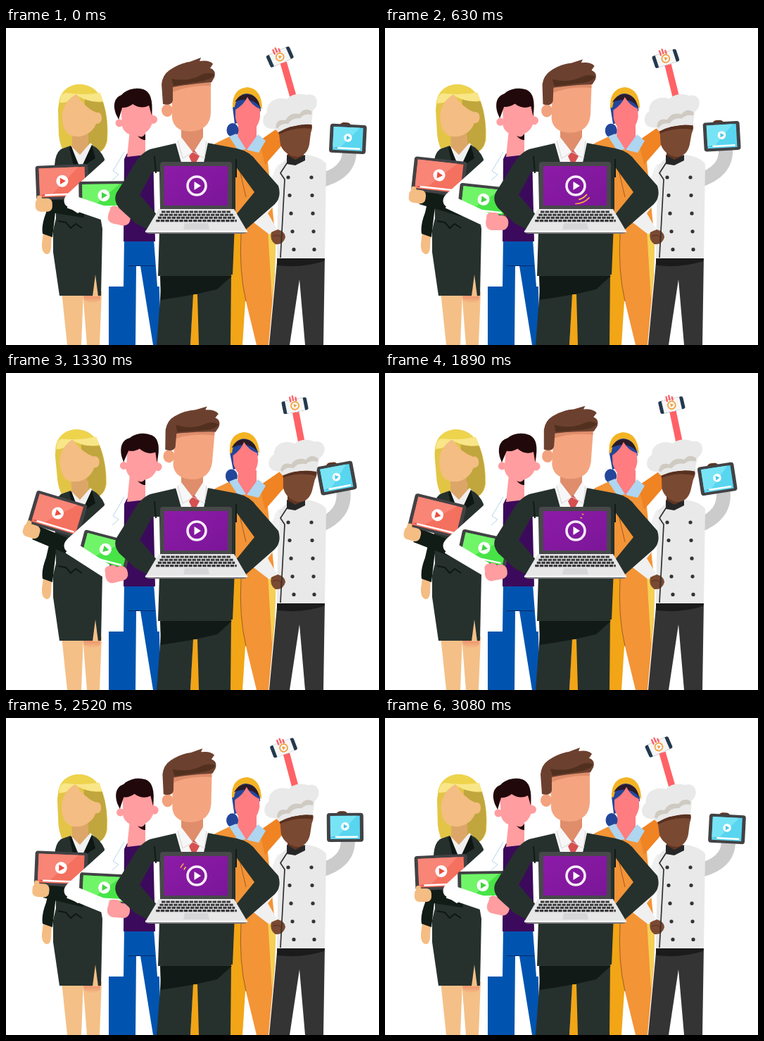
An HTML page for the animation above (3.15 s loop, 530 px wide and 450 px high).

```html
<!DOCTYPE html>
<html lang="en">
<head>
<meta charset="utf-8">
<title>Team with play screens</title>
<style>
html, body { margin: 0; width: 100%; height: 100%; overflow: hidden; background: #fff; }
svg { display: block; width: 530px; height: 450px; }
</style>
</head>
<body>
<svg id="stage" viewBox="0 0 530 450">
  <defs>
    <linearGradient id="purple" x2="1" y2="1">
      <stop stop-color="#8d1ba8"/><stop offset="1" stop-color="#7b1698"/>
    </linearGradient>
    <linearGradient id="blush" x2="0" y2="1">
      <stop stop-color="#ee8a68"/><stop offset="1" stop-color="#f4c088"/>
    </linearGradient>
  </defs>

  <g id="assistant">
    <path fill="#f4c088" d="M79 374H110L107 450H87ZM109 374H136L133 450H115Z"/>
    <path fill="url(#blush)" d="M110 378H134V386Q122 396 111 386Z"/>
    <path fill="#f4bd83" d="M53 291H65L64 312Q63 322 57 321Q50 318 51 306Z"/>
    <path fill="#111c16" d="M74 238L70 262L66 297L52 292Q50 280 57 262L62 240Z"/>
    <g id="blondHead">
      <path fill="#e3c546" d="M104 80C86 81 76 92 74 116L75 152Q77 170 84 178H124Q140 178 144 160C146 136 142 114 137 103C131 88 119 80 104 80Z"/>
      <path fill="#c0a63d" d="M112 100Q128 107 138 105Q146 132 143 160Q139 178 124 178H110Z"/>
      <path fill="#eed44d" d="M104 80C86 81 77 92 75 106Q104 92 138 105C131 88 119 80 104 80Z"/>
      <path fill="#f8e688" d="M77 100Q79 93 85 92Q112 96 134 92L138 104Q118 107 102 96Q90 107 76 106Z"/>
      <path fill="#dda669" d="M94 148H117V172L105 184L94 172Z"/>
      <path fill="#f4bd83" d="M100 94Q83 103 80 122Q79 143 89 151Q99 157 112 152Q124 147 128 136Q137 136 136 126Q135 119 128 120Q113 114 100 94Z"/>
    </g>
    <path fill="#dda669" d="M95 154H117V172L105 184L95 172Z"/>
    <path fill="#f0f0f0" d="M92 167L105 180L120 163L127 170L108 198H95Z"/>
    <path fill="#26312d" d="M92 167L78 172Q70 178 69 195L71 270L67 287V318L76 380H135L137 285L133 262L140 186Q134 172 122 166L106 200Z"/>
    <path fill="#f4c088" d="M127 350L123 381H131Z"/>
    <path fill="none" stroke="#0e1713" stroke-width="2" d="M74 274L85 276L92 284L99 278L108 284"/>
    <path fill="#0e1713" d="M90 170L96 196L104 199L93 168ZM122 166L127 185L116 192L107 200Z"/>
    <line id="blondArm" stroke="#111c16" stroke-width="21"/>
    <g id="redTablet"></g>
    <g id="blondHand" fill="#f4bd83">
      <rect x="-11" y="-9" width="24" height="19" rx="7"/>
      <rect x="-9" y="-13" width="7" height="13" rx="3"/>
    </g>
  </g>

  <g id="doctor">
    <path fill="#0054b0" d="M167 300H216L220 450H209L191 338H185L184 450H146V362Z"/>
    <path fill="none" stroke="#062b66" d="M173 337.500H212"/>
    <path fill="#fff" d="M166 174L140 190L138 268L137 367H167L168 298L210 300L215 367H222L218 174Z"/>
    <path fill="#3c0a5c" d="M172 178H209L212 303H167L168 186Z"/>
    <path fill="#ff9da0" d="M176 144H198V180L172 183Z"/>
    <path fill="#25090b" d="M187 153Q194 157 198 150V159Q192 159 187 153Z"/>
    <g id="doctorHead">
      <circle cx="161" cy="135" r="5.500" fill="#ff9da0"/><circle cx="209" cy="130" r="6" fill="#ff9da0"/>
      <path fill="#ff9da0" d="M163 108L205 103L209 128Q207 149 188 152Q170 154 165 140Z"/>
      <path fill="#21080a" d="M160 130L156 122Q150 105 160 97Q165 95 167 92Q180 83 195 87Q210 92 207 124L203 110Q192 116 180 108Q172 114 165 113Z"/>
    </g>
    <path fill="#fff" d="M166 174L140 188L90 233Q78 243 85 252L102 263L152 230Z"/>
    <path fill="none" stroke="#b6d6ea" d="M168 176L152 203L160 208L151 216"/>
    <g id="greenTablet"></g>
    <line id="doctorArm" stroke="#fff" stroke-width="20"/>
    <g id="doctorHand" fill="#ff9da0">
      <rect x="-16" y="-10" width="32" height="21" rx="9"/>
      <rect x="-15" y="-14" width="18" height="14" rx="6"/>
    </g>
  </g>

  <g id="worker">
    <line id="phoneArm" stroke="#ff6266" stroke-width="9.500"/>
    <path fill="#f2a516" d="M300 290H340V388L336 450H262L266 370Z"/>
    <path fill="#f39436" d="M318 154L297 164L300 300L334 291Q331 345 341 388L356 450H373L382 350L383 300L372 190L368 165L362 154Z"/>
    <path fill="#f5d055" d="M371 270L383 300L382 345L378 386Z"/>
    <path fill="#f08322" d="M360 160L392 138L398 148L396 162L368 194Z"/>
    <path fill="none" stroke="#a15b27" d="M333 178V206L341 240M334 292Q331 345 341 388"/>
    <path fill="#ff7c80" d="M330 138H356V156L342 174L329 154Z"/>
    <g id="workerHead">
      <ellipse cx="322" cy="145" rx="8.500" ry="10" fill="#24469a"/>
      <path fill="#24469a" d="M322 112Q324 88 343 88Q363 91 362 118L340 132L325 136Z"/>
      <path fill="#f3b323" d="M322 113Q321 86 343 84Q364 86 364 116L360 109Q356 94 342 93Q328 94 325 112Z"/>
      <path fill="#2b1b29" d="M325 105Q332 93 344 94Q358 96 361 112Q348 96 325 105Z"/>
      <path fill="#ff7c80" d="M326 116Q338 109 343 98Q349 110 361 115V127Q357 146 344 147Q330 146 326 128Z"/>
    </g>
    <path fill="#aed6f0" d="M327 150L317 154L330 174L341 172ZM358 151L369 160L359 177L342 173Z"/>
    <g id="phone">
      <rect x="-18" y="-9" width="36" height="18" rx="2.500" fill="#23394d"/>
      <rect x="-13" y="-9" width="26" height="18" fill="#f7f7f7"/>
      <circle r="5.500" fill="none" stroke="#f3a03c" stroke-width="1.700"/>
      <path fill="#f3a03c" d="M-1.500 -2.700L3 0L-1.500 2.700Z"/>
      <path fill="none" stroke="#ff6266" stroke-width="2.400" stroke-linecap="round" d="M-5 -13L-5 -7M-1 -14L-1 -8M3 -11L3 -7"/>
    </g>
  </g>

  <g id="chef">
    <path fill="#343434" d="M386 322H453L451 450H425L417 357L403 450H374Z"/>
    <path fill="#1b1b1b" d="M385 327H453L452 331Q420 341 385 337Z"/>
    <path id="chefArm" fill="none" stroke="#cbcbcb" stroke-width="20"/>
    <g id="chefHand">
      <rect x="-13" y="-23" width="17" height="19" rx="6" fill="#5e3522"/>
    </g>
    <g id="cyanTablet"></g>
    <path fill="#e9e9e9" d="M398 186L387 196L385 327H453L455 193Q448 183 427 180Z"/>
    <path fill="#f0f0f0" d="M388 192Q380 200 372 236L344 270L374 293L385 285L372 263L390 240Z"/>
    <path fill="#7a4932" d="M377 290L386 286Q397 289 397 297Q394 308 383 307Q374 301 377 290Z"/>
    <path fill="none" stroke="#59301f" d="M379 296Q386 292 391 297"/>
    <path fill="none" stroke="#303030" stroke-width="1.700" d="M401 189L390 206L396 215L390 326"/>
    <g id="buttons" fill="#343434"></g>
    <path fill="#623522" d="M400 165H423V184L411 194L400 185Z"/>
    <path fill="#272727" d="M399 180L411 187L425 180V188L411 195L399 193Z"/>
    <g id="chefHead">
      <path fill="#7a4932" d="M387 143L433 136Q437 138 433 149L431 165Q428 181 414 183Q396 181 390 166Z"/>
      <path fill="#59301f" d="M386 144L434 134V143Q410 140 388 151Z"/>
      <path fill="#e9e9e9" d="M387 148L381 143C362 145 362 126 371 120C369 105 384 97 399 101C407 92 420 93 426 95C443 90 446 110 436 117L434 137Q409 135 387 148Z"/>
      <path fill="#cfcac2" d="M383 141Q384 128 397 131Q403 119 417 122Q424 112 434 118V123Q424 121 418 128Q406 127 401 136Q390 135 386 143Z"/>
    </g>
  </g>

  <g id="manager">
    <path fill="#26312d" d="M222 345H320L319 450H274L272 378H266L262 450H214Z"/>
    <path fill="#111a16" d="M219 352H321L300 371Q264 380 220 386Z"/>
    <path fill="#26312d" d="M244 163L205 172Q190 178 179 199L157 234Q152 245 161 256L184 277L212 292L217 268L190 237L208 204H218L219 256L216 352L322 350L326 255V196L353 233L326 266L334 292L382 250Q392 240 387 224L357 190Q347 175 328 171L286 163Z"/>
    <path fill="none" stroke="#121a17" stroke-width="2" d="M211 182L213 206M327 186V212M242 166L250 190M286 166L278 190"/>
    <path fill="#df8d6b" d="M249 136H280V164L266 178L249 164Z"/>
    <path fill="#f7f7f7" d="M249 155L241 163L249 191H281L287 163L280 155L266 177Z"/>
    <path fill="#d75050" d="M260 182L267 173L275 182L270 191H264Z"/>
    <path fill="none" stroke="#d4d4d4" d="M244 160L251 185L266 176L282 185L285 160"/>
    <g id="managerHead">
      <ellipse cx="229" cy="117" rx="8" ry="9" fill="#f2a27d"/>
      <path fill="#f4a580" d="M235 80H291V120Q290 145 263 147Q239 147 236 128Z"/>
      <path fill="#df8d6b" d="M237 83Q258 78 291 77V82Q260 81 237 91Z"/>
      <path fill="#6c402f" d="M223 108L221 80Q222 67 232 60Q246 50 261 48L277 42L275 47Q289 45 294 51L290 57Q299 60 296 70L292 77Q263 79 237 84V103Q235 111 223 108Z"/>
      <path fill="#52301f" d="M235 72Q260 77 278 66Q289 62 296 66Q291 74 275 76L238 82Z"/>
    </g>
    <g id="laptop">
      <rect x="219" y="190" width="102" height="70" rx="4" fill="#48484b"/>
      <rect x="225" y="196" width="90" height="56" fill="url(#purple)"/>
      <g id="sparks" fill="none" stroke-width="1.600" stroke-linecap="round"></g>
      <circle cx="271" cy="224" r="13" fill="none" stroke="#f8edfa" stroke-width="3.600"/>
      <path fill="#fff" d="M267.500 218L277 224L267.500 230Z"/>
      <path fill="#e7e7e8" d="M217 257H324L343 289H198Z"/>
      <path fill="#d6d6d8" d="M254 277H287L289 286H252Z"/>
      <g id="keys" stroke="#38383b" stroke-width="3.100" stroke-dasharray="5.400 1.200"></g>
      <path fill="#77777a" d="M198 289H343Q342 292 336 292H205Q199 292 198 289Z"/>
      <path fill="#f5f5f5" d="M198 287.500H343V290H198Z"/>
    </g>
  </g>
</svg>
<script>
const FRAME = 70, LOOP = 3150, PEAK = 1470;
const $ = id => document.getElementById(id);
const mix = (a, b, s) => a + (b - a) * s;

function drawTablet(id, w, h, screen, shine, accent, r) {
  const x = -w / 2, y = -h / 2, m = 5;
  $(id).innerHTML = `
    <rect x="${x}" y="${y}" width="${w}" height="${h}" rx="4" fill="#424245"/>
    <rect x="${x + m}" y="${y + 4}" width="${w - 2 * m}" height="${h - 8}" fill="${screen}"/>
    <path d="M${x + m} ${y + 4}H${w * .32}L${-w * .2} ${h / 2 - 8}H${x + m}Z" fill="${shine}"/>
    <path d="M${x + m + 3} ${h / 2 - 7}H${w / 2 - m - 3}" stroke="#fff" stroke-width="2.500"/>
    <path d="M${x + m + 3} ${h / 2 - 7}h4" stroke="${accent}" stroke-width="2.500"/>
    <g transform="translate(0 -1.500)">
      <circle r="${r}" fill="#fff"/>
      <path d="M${-r * .35} ${-r * .55}L${r * .6} 0L${-r * .35} ${r * .55}Z" fill="${accent}"/>
    </g>`;
}
drawTablet("redTablet", 75, 49, "#f4705f", "#f88576", "#ec4c3f", 8.5);
drawTablet("greenTablet", 71, 43, "#48e447", "#70f568", "#42d240", 8.5);
drawTablet("cyanTablet", 52, 41, "#58d5ef", "#77e4f5", "#42c5e4", 5.8);

for (let i = 0; i < 5; i++) {
  const y = 212 + i * 25.6;
  $("buttons").innerHTML +=
    `<circle cx="${401 + i * 2}" cy="${y}" r="2.600"/><circle cx="${434 + i}" cy="${y}" r="2.600"/>`;
}
for (let i = 0; i < 4; i++) {
  const y = 261 + i * 4.2;
  $("keys").innerHTML += `<path d="M${221 - i * 2.6} ${y}H${320 + i * 2.6}"/>`;
}

// [id, start x, y, angle, end x, y, angle]
const movers = [
  ["redTablet", 80, 219, -2.5, 73, 200, 17],
  ["blondHand", 53, 251, 0, 35, 223, 17],
  ["greenTablet", 139, 239, -1, 141, 252, 15],
  ["doctorHand", 161, 268, 12, 157, 286, -15],
  ["phone", 389, 41, -24, 411, 46.5, -11],
  ["cyanTablet", 486, 157.5, 3, 469.5, 149, -11],
  ["chefHand", 486, 157.5, 3, 469.5, 149, -8]
];

// [id, pivot x, pivot y, end angle, end shift x, y]
const heads = [
  ["blondHead", 106, 162, -4, -1, 0],
  ["doctorHead", 188, 158, 8, 3, 0],
  ["workerHead", 342, 155, -4, -1, 0],
  ["chefHead", 411, 182, 7, 2, 0],
  ["managerHead", 263, 156, 5, -1, 4]
];

// [id, fixed-end and free-end coordinates at the start, then at the end]
const arms = [
  ["blondArm", [112, 259, 60, 251], [112, 256, 41, 226]],
  ["doctorArm", [90, 246, 149, 266], [90, 247, 142, 281]],
  ["phoneArm", [411, 108, 394, 49], [422, 108, 412, 56]]
];

function sparkArc(radius, angle, span, color) {
  const point = deg => {
    const a = deg * Math.PI / 180;
    return `${271 + radius * Math.sin(a)} ${224 - radius * Math.cos(a)}`;
  };
  return `<path stroke="${color}" d="M${point(angle - span)}A${radius} ${radius} 0 0 1 ${point(angle)}"/>`;
}

function drawSparks(time) {
  const age = (time - 245 + LOOP) % (LOOP / 2);
  if (age > 830) { $("sparks").innerHTML = ""; return; }
  const angle = 24 + (age - 70) * .45;
  const span = 50 * Math.sin(Math.PI * Math.min(1, age / 850)) ** 2;
  $("sparks").innerHTML = sparkArc(20, angle, span * .75, "#f7d13d") +
    sparkArc(25.5, angle + span * .3, span, "#f5a83c");
}

function render(now) {
  const time = Math.floor(now % LOOP / FRAME) * FRAME;
  const s = (1 + Math.cos(2 * Math.PI * (time - PEAK) / LOOP)) / 2;

  for (const [id, x0, y0, a0, x1, y1, a1] of movers)
    $(id).setAttribute("transform",
      `translate(${mix(x0, x1, s)} ${mix(y0, y1, s)}) rotate(${mix(a0, a1, s)})`);

  for (const [id, x, y, angle, dx, dy] of heads)
    $(id).setAttribute("transform", `translate(${dx * s} ${dy * s}) rotate(${angle * s} ${x} ${y})`);

  for (const [id, from, to] of arms)
    ["x1", "y1", "x2", "y2"].forEach((key, i) => $(id).setAttribute(key, mix(from[i], to[i], s)));

  const wristX = mix(488, 479, s), wristY = mix(174, 166, s);
  $("chefArm").setAttribute("d",
    `M444 217Q${mix(489, 484, s)} ${mix(207, 201, s)} ${wristX} ${wristY}`);
  drawSparks(time);
}

let start;
function tick(now) {
  start ??= now;
  render(now - start);
  requestAnimationFrame(tick);
}
render(0);
requestAnimationFrame(tick);
</script>
</body>
</html>
```
